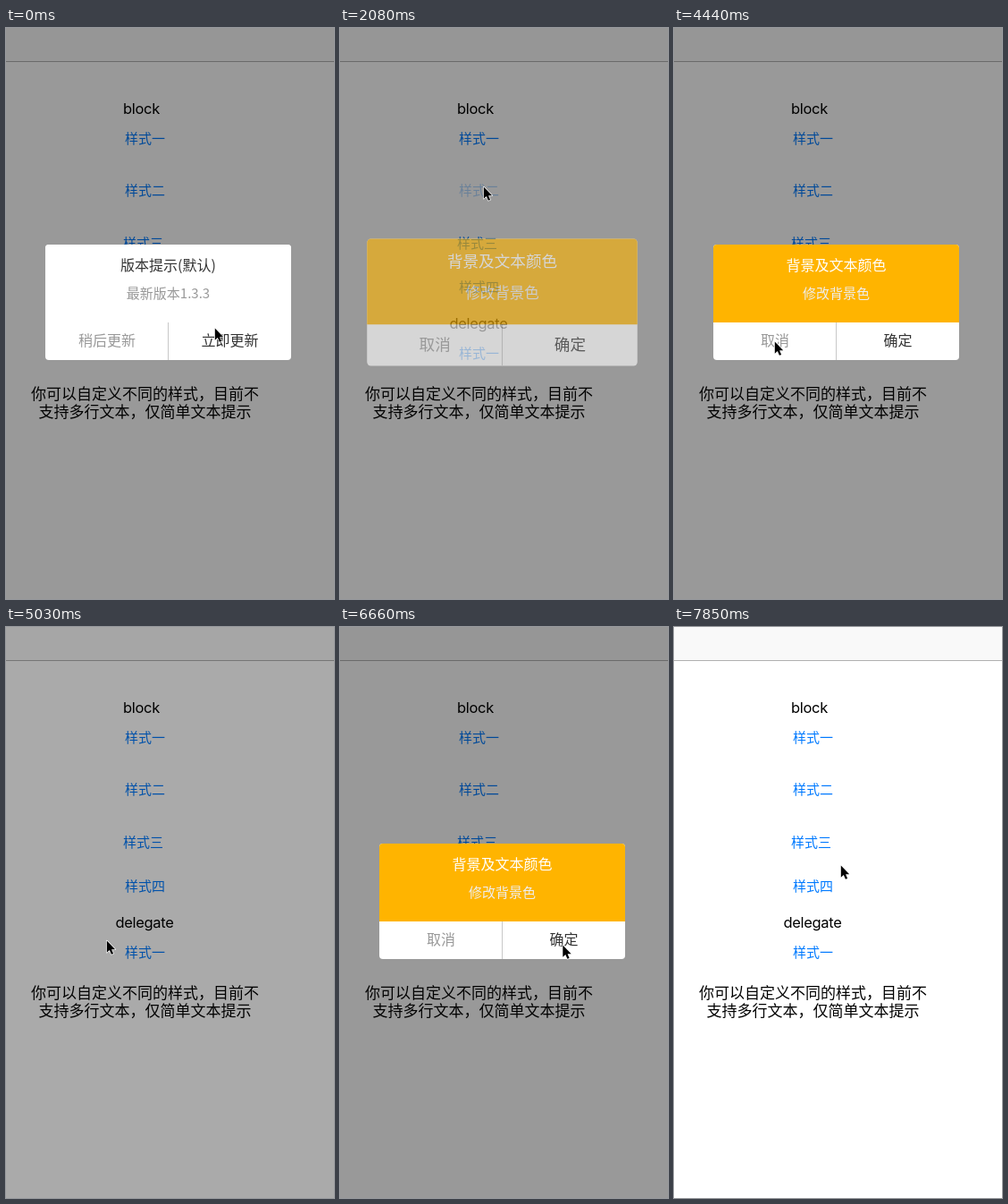
An HTML page that plays this animation: 367 px wide and 638 px high, repeating every 8 s.

```html
<!DOCTYPE html>
<html lang="zh-CN">
<head>
<meta charset="utf-8">
<title>弹窗样式</title>
<style>
html, body { margin: 0; width: 100%; height: 100%; overflow: hidden; background: #fff; }
svg { display: block; width: 367px; height: 638px; }
text { font-family: "Noto Sans CJK SC", "Noto Sans CJK", sans-serif; text-anchor: middle; }
.latin { font: 16.5px Inter, "Liberation Sans", sans-serif; letter-spacing: -.3px; }
</style>
</head>
<body>
<svg viewBox="0 0 367 638">
  <rect width="367" height="638" fill="#fff"/>
  <rect width="367" height="37" fill="#f9f9f9"/>
  <rect y="37" width="367" height="1" fill="#b0b0b0"/>
  <text class="latin" x="151.5" y="96">block</text>
  <text class="latin" x="155" y="336">delegate</text>
  <g id="page"></g>
  <rect id="dim" width="367" height="638"/>
  <g id="update"></g>
  <g id="color"></g>
  <g id="cursor">
    <path d="M.8 .5V13.8L3.8 11L5.9 15.8L8.1 14.9L6.1 10.2H10.2Z"
          stroke="#fff" stroke-width="1.4" stroke-linejoin="round" paint-order="stroke"/>
  </g>
</svg>
<script>
const LOOP = 8000;
const STEP = LOOP / 54;   // the picture changes only on these beats
const CX = 181.5, CY = 306.5;
const $ = id => document.getElementById(id);

function add(parent, tag, attrs, str) {
  const el = document.createElementNS('http://www.w3.org/2000/svg', tag);
  for (const k in attrs) el.setAttribute(k, attrs[k]);
  if (str) el.textContent = str;
  return parent.appendChild(el);
}

// y is the middle of the line
function label(parent, str, x, y, size, fill) {
  const baseline = Math.round(y + size * 0.38) - 1;
  return add(parent, 'text', { x, y: baseline, 'font-size': size, fill }, str);
}

const links = [
  ['样式一', 155.5, 124.5], ['样式二', 155.5, 182.5], ['样式三', 153.5, 241.5],
  ['样式四', 155.5, 290.5], ['样式一', 155.5, 364.5]
].map(([str, x, y]) => label($('page'), str, x, y, 15, '#007aff'));
label($('page'), '你可以自定义不同的样式，目前不', 155.5, 409.5, 17, '#000');
label($('page'), '支持多行文本，仅简单文本提示', 155.5, 429.5, 17, '#000');

function dialog(g, top, title, titleFill, msg, msgFill, cancel, ok) {
  add(g, 'rect', { x: 44, y: 242, width: 275, height: 129, rx: 4, fill: '#fff' });
  add(g, 'path', { d: 'M44 329V246a4 4 0 0 1 4-4H315a4 4 0 0 1 4 4V329Z', fill: top });
  add(g, 'rect', { x: 181, y: 329, width: 1, height: 42, fill: '#c8c8c8' });
  label(g, title, CX, 265.5, 16, titleFill);
  label(g, msg, CX, 297, 15, msgFill);
  label(g, cancel, 113, 350, 16, '#999');
  label(g, ok, 250.5, 350, 16, '#333');
}
dialog($('update'), '#fff', '版本提示(默认)', '#333', '最新版本1.3.3', '#999', '稍后更新', '立即更新');
dialog($('color'), '#ffb400', '背景及文本颜色', '#fff', '修改背景色', '#eee', '取消', '确定');

// beats on which each dialog opens and closes
const shows = [
  { id: 'update', open: -9, close: 7 },
  { id: 'color', open: 14, close: 34 },
  { id: 'color', open: 40, close: 50 }
];

// pointer glides: first beat, last beat, where it ends
const glides = [
  [0, 2, 234, 350], [7, 12, 160, 177], [17, 22, 192, 305], [23, 26, 252, 343],
  [26, 30, 112, 350], [35, 40, 153, 177], [41, 45, 248.5, 355], [50, 53, 186, 266]
];

const clamp = v => Math.min(1, Math.max(0, v));
const ease = v => v * v * (3 - 2 * v);

function pointer(beat) {
  let x = 233, y = 335;
  for (const [from, to, toX, toY] of glides) {
    const e = ease(clamp((beat - from) / (to - from)));
    x += (toX - x) * e;
    y += (toY - y) * e;
  }
  return `translate(${x} ${y})`;
}

function draw(t) {
  const beat = Math.floor((t + 12) / STEP);
  const show = shows.find(s => beat >= s.open && beat < s.close);
  const closing = shows.some(s => beat === s.close);
  const age = show ? beat - show.open : 9;
  const scale = 1 + 0.1 * clamp(1 - age);

  $('cursor').setAttribute('transform', pointer(beat));
  $('dim').setAttribute('opacity', show ? 0.4 : closing ? 1 / 3 : 0);
  links[1].setAttribute('opacity', clamp(0.3 + 0.4 * age));
  for (const id of ['update', 'color']) {
    const on = show && show.id === id;
    $(id).setAttribute('opacity', on ? clamp(0.6 + 0.4 * age) : 0);
    $(id).setAttribute('transform',
      `translate(${CX} ${CY}) scale(${scale}) translate(${-CX} ${-CY})`);
  }
}

const start = performance.now();
function tick() {
  draw((performance.now() - start) % LOOP);
  requestAnimationFrame(tick);
}
tick();
</script>
</body>
</html>
```
